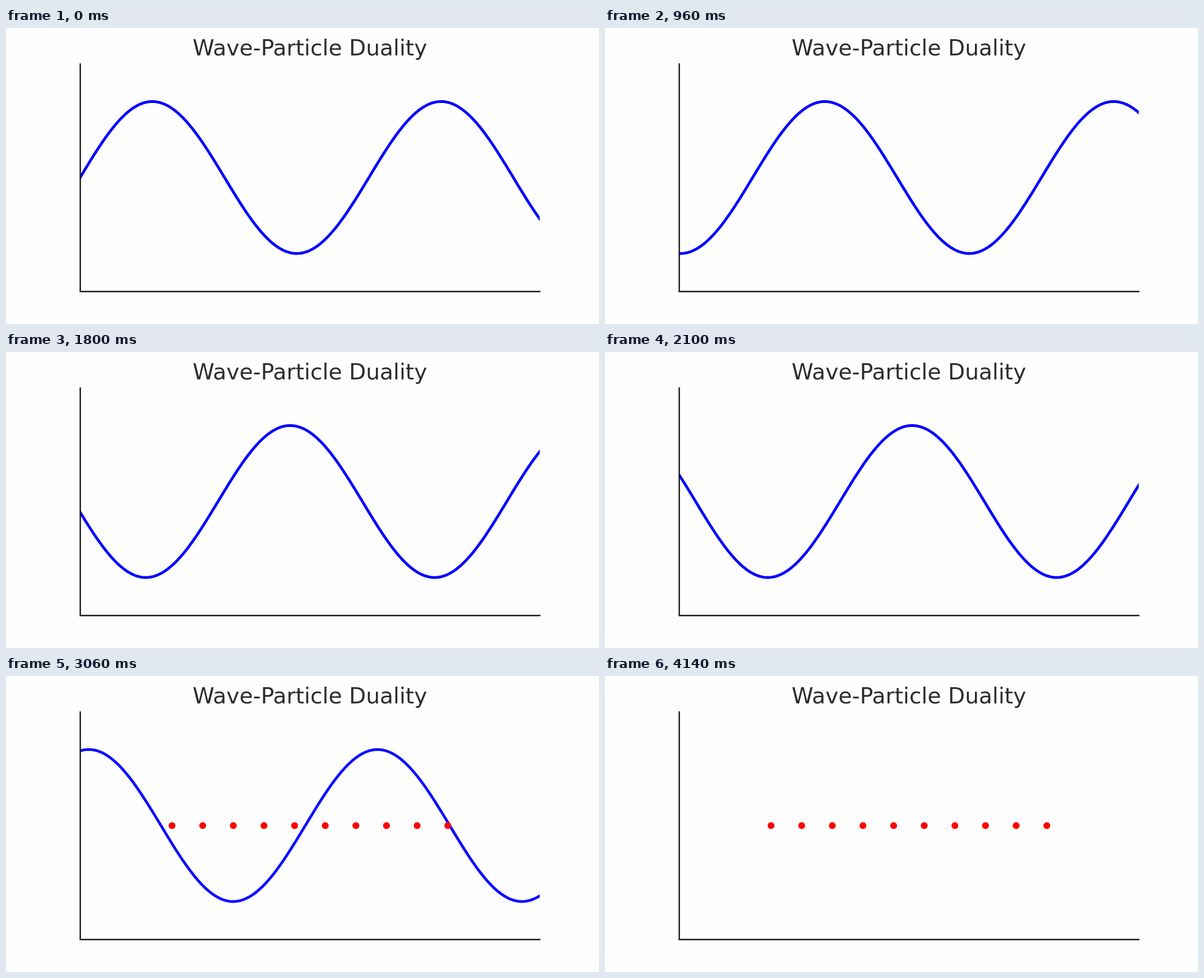
Recreate the animation shown at these times as an HTML page. Size 1058 px wide and 529 px high, loop 4200 ms.

```html
<!DOCTYPE html>
<html lang="en">
<head>
<meta charset="utf-8">
<title>Wave-Particle Duality</title>
<style>
  html, body { margin: 0; width: 100%; height: 100%; overflow: hidden; background: #fefefe; }
  svg { display: block; width: 1058px; height: 529px; }
  text { font: 39.2px "DejaVu Sans", sans-serif; fill: #2d2d2d; text-anchor: middle; }
  #wave { fill: none; stroke: #00f; stroke-width: 4.9; stroke-linejoin: round; }
  #dots { fill: #f00; }
  #axes { fill: none; stroke: #141414; stroke-width: 2.4; stroke-linecap: square; }
</style>
</head>
<body>
<svg viewBox="0 0 1058 529">
  <clipPath id="plot"><rect x="132.25" y="63.5" width="820" height="407.3"/></clipPath>
  <text x="542.2" y="48.8">Wave-Particle Duality</text>
  <g clip-path="url(#plot)"><path id="wave"/></g>
  <g id="dots"></g>
  <path id="axes" d="M132.5 64.5V471H952.3"/>
</svg>
<script>
  const STEP_MS = 60, STEPS = 70, FADE_START = 50;
  const LEFT = 132.25, UNIT = 82, MIDDLE = 267.2, AMPLITUDE = 135.8;
  const wave = document.getElementById('wave');
  const dots = document.getElementById('dots');
  const toX = value => LEFT + value * UNIT;

  // Ten particles spread evenly from 2 to 8 on the x axis.
  for (let i = 0; i < 10; i++) {
    const dot = document.createElementNS(dots.namespaceURI, 'circle');
    dot.setAttribute('cx', toX(2 + i * 6 / 9));
    dot.setAttribute('cy', MIDDLE + 0.2);
    dot.setAttribute('r', 6.1);
    dots.append(dot);
  }

  function wavePath(phase) {
    const points = [];
    for (let x = -0.05; x <= 10.06; x += 0.05) {
      points.push(toX(x).toFixed(2) + ' ' + (MIDDLE - AMPLITUDE * Math.sin(x - phase)).toFixed(2));
    }
    return 'M' + points.join('L');
  }

  function draw(step) {
    const fading = step >= FADE_START;
    const phase = Math.min(step, FADE_START - 1) / 10;
    wave.setAttribute('d', wavePath(phase));
    wave.style.opacity = fading ? 1 - (step - FADE_START) / (STEPS - 1 - FADE_START) : 1;
    dots.style.visibility = fading ? 'visible' : 'hidden';
  }

  let start, shown = -1;
  function tick(now) {
    start ??= now;
    const step = Math.floor(Math.max(0, now - start) / STEP_MS) % STEPS;
    if (step !== shown) draw(shown = step);
    requestAnimationFrame(tick);
  }
  draw(0);
  requestAnimationFrame(tick);
</script>
</body>
</html>
```
